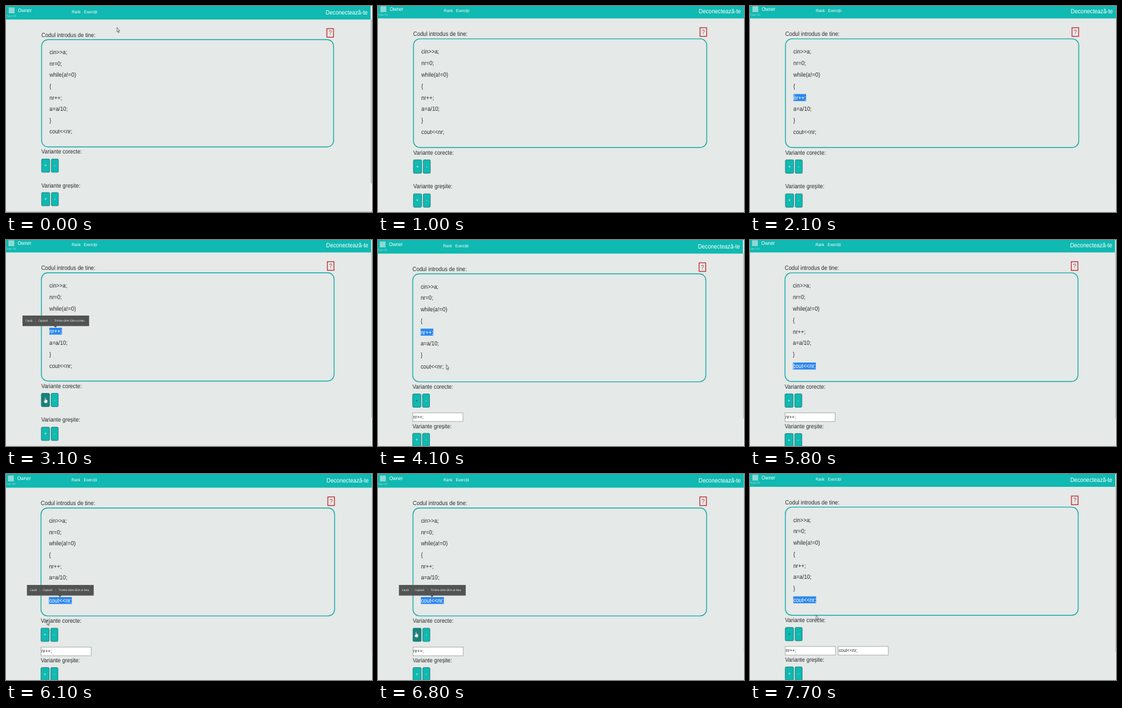
Recreate the animation shown at these times as an HTML page. Size 600 px wide and 338 px high, loop 8000 ms.

```html
<!DOCTYPE html>
<html lang="ro">
<head>
<meta charset="utf-8">
<title>Variante de cod</title>
<style>
  html, body { margin: 0; width: 100%; height: 100%; overflow: hidden; background: #e5e9e8; }
  svg { display: block; width: 600px; height: 338px; }

  text {
    font: 8.87px "Liberation Sans", Arial, sans-serif;
    fill: #2b2f2f;
    text-rendering: geometricPrecision;
    transform-box: fill-box;
    transform-origin: 0 81%;
    transform: scaleY(1.12);
  }
  .bar text { fill: #fff; }
  .bar .user { font-size: 7.6px; }
  .bar .link { font-size: 6.2px; }
  .bar .exit { font-size: 9.1px; }
  .bar .brand { font-size: 4.1px; fill: #a5dfdb; }
  .teal { fill: #10b9b1; }
  .frame { fill: none; stroke: #18ada7; stroke-width: 1.4; }
  .help rect { fill: none; stroke: #c4383a; stroke-width: 1.4; }
  .help text { fill: #b83a3c; font-size: 9px; text-anchor: middle; }
  .btn rect { fill: #10b9b1; stroke: #17706c; stroke-width: .8; }
  .btn text { fill: #fff; font-size: 6.6px; text-anchor: middle; }
  .field rect { fill: #fff; stroke: #999e9d; stroke-width: .8; }
  .field text { font-size: 7.3px; }
  .sel rect { fill: #2c87ec; }
  .sel text { fill: #fff; }
  .tip { fill: #525454; }
  .tip text { font: 4.2px "Open Sans", sans-serif; fill: #fff; }
  .tip line { stroke: #858787; stroke-width: .5; }

  .cam, .sel, .tip, .lower, .field, .cursor, .cursor g, .add rect, .add text {
    animation: 8s step-end infinite;
  }
  .cam { animation-name: cam; }
  .sel1 { animation-name: sel1; }
  .sel2 { animation-name: sel2; }
  .tip { animation-name: tip; }
  .lower { animation-name: lower; }
  .field1 { animation-name: field1; }
  .field2 { animation-name: field2; }
  .add rect { animation-name: hover; }
  .add text { animation-name: focus; }
  .cursor { animation-name: pointer; }
  .cursor .arrow { animation-name: arrow; }
  .cursor .beam { animation-name: beam; }
  .cursor .hand { animation-name: hand; }

  @keyframes cam {
    0% { transform: none; }
    12.5% { transform: translate(-.5px, -2.1px) scale(1.0045, 1.0135); }
    36.25% { transform: translate(-.5px, -2px) scale(1.0025, 1.0097); }
    51.25% { transform: translate(-1.7px, 0) scale(1.004, 1.006); }
    63.75% { transform: translate(-1.2px, -2.1px) scale(1.0035, 1.0135); }
    76.25% { transform: translate(-1.3px, .1px) scale(1.0055, 1.007); }
    90%, 100% { transform: translate(-.6px, -1.3px) scale(1.003, 1.008); }
  }
  @keyframes sel1 {
    0% { clip-path: inset(0 0 0 100%); }
    23.75% { clip-path: inset(0 0 0 75%); }
    25% { clip-path: inset(0 0 0 40%); }
    26.25% { clip-path: inset(0); }
    60%, 100% { clip-path: inset(0 0 0 100%); }
  }
  @keyframes sel2 {
    0% { clip-path: inset(0 0 0 100%); }
    61.25% { clip-path: inset(0 0 0 50%); }
    63.75%, 100% { clip-path: inset(0); }
  }
  @keyframes tip {
    0% { visibility: hidden; transform: translate(27.4px, 124.6px); }
    36.25% { visibility: visible; transform: translate(27.4px, 124.6px); }
    48.75% { visibility: hidden; transform: translate(35.3px, 180.7px); }
    76.25% { visibility: visible; transform: translate(35.3px, 180.7px); }
    90%, 100% { visibility: hidden; transform: translate(35.3px, 180.7px); }
  }
  @keyframes lower {
    0% { transform: none; }
    51.25%, 100% { transform: translateY(9.2px); }
  }
  @keyframes field1 {
    0% { visibility: hidden; }
    51.25%, 100% { visibility: visible; }
  }
  @keyframes field2 {
    0% { visibility: hidden; }
    90%, 100% { visibility: visible; }
  }
  @keyframes hover {
    0% { fill: #10b9b1; }
    38.75% { fill: #14827e; }
    51.25% { fill: #10b9b1; }
    77.5% { fill: #14827e; }
    96.25%, 100% { fill: #10b9b1; }
  }
  @keyframes focus {
    0% { fill: #fff; }
    48.75% { fill: #17504d; }
    60% { fill: #fff; }
    90%, 100% { fill: #17504d; }
  }
  @keyframes pointer {
    0% { transform: translate(182px, 35px); }
    12.5% { transform: translate(94px, 150px); }
    23.75% { transform: translate(87px, 150px); }
    25% { transform: translate(80px, 150px); }
    26.25% { transform: translate(72.6px, 150px); }
    36.25% { transform: translate(70px, 215px); }
    38.75% { transform: translate(64.8px, 257.5px); }
    51.25% { transform: translate(113.3px, 203.2px); }
    60% { transform: translate(109px, 206px); }
    61.25% { transform: translate(90px, 206px); }
    63.75% { transform: translate(72.4px, 206px); }
    76.25% { transform: translate(68px, 238px); }
    77.5% { transform: translate(63.3px, 256.5px); }
    96.25%, 100% { transform: translate(108.8px, 231px); }
  }
  @keyframes arrow {
    0% { visibility: visible; }
    12.5% { visibility: hidden; }
    36.25% { visibility: visible; }
    38.75% { visibility: hidden; }
    51.25% { visibility: visible; }
    60% { visibility: hidden; }
    76.25% { visibility: visible; }
    77.5% { visibility: hidden; }
    96.25%, 100% { visibility: visible; }
  }
  @keyframes beam {
    0% { visibility: hidden; }
    12.5% { visibility: visible; }
    36.25% { visibility: hidden; }
    60% { visibility: visible; }
    76.25%, 100% { visibility: hidden; }
  }
  @keyframes hand {
    0% { visibility: hidden; }
    38.75% { visibility: visible; }
    51.25% { visibility: hidden; }
    77.5% { visibility: visible; }
    96.25%, 100% { visibility: hidden; }
  }
</style>
</head>
<body>
<svg viewBox="0 0 600 338">
  <g class="cam">
    <rect x="597.7" y="-5" width="10" height="350" fill="#f0f2f1"/>
    <rect x="597.7" y="22" width="10" height="269" fill="#c3c7c6"/>
    <rect x="-5" y="336.6" width="610" height="4" fill="#c6cac9"/>

    <g class="bar">
      <rect class="teal" x="-5" y="-5" width="602.7" height="27.2"/>
      <rect x="4.5" y="2.5" width="9.5" height="9.5" fill="#8fd8d3"/>
      <text class="brand" x=".6" y="17.6">Tutor OX</text>
      <text class="user" x="19.6" y="10.3">Owner</text>
      <text class="link" x="108" y="12.4">Rank</text>
      <text class="link" x="128" y="12.4">Exerciții</text>
      <text class="exit" x="524" y="14">Deconectează-te</text>
    </g>

    <text x="58" y="50.8">Codul introdus de tine:</text>
    <g class="help">
      <rect x="526" y="37.2" width="10.8" height="14"/>
      <text x="531.4" y="47.4">?</text>
    </g>

    <rect class="frame" x="58.4" y="55.2" width="478.6" height="176" rx="10.5"/>
    <g>
      <text x="71.3" y="79.2">cin&gt;&gt;a;</text>
      <text x="71.3" y="97.8">nr=0;</text>
      <text x="71.3" y="116.4">while(a!=0)</text>
      <text x="71.3" y="135">{</text>
      <text x="71.3" y="153.6">nr++;</text>
      <text x="71.3" y="172.2">a=a/10;</text>
      <text x="71.3" y="190.9">}</text>
      <text x="71.3" y="209.5">cout&lt;&lt;nr;</text>
    </g>
    <g class="sel sel1">
      <rect x="71.1" y="144.4" width="21" height="11.6"/>
      <text x="71.3" y="153.6">nr++;</text>
    </g>
    <g class="sel sel2">
      <rect x="71.1" y="200.3" width="37.8" height="11.6"/>
      <text x="71.3" y="209.5">cout&lt;&lt;nr;</text>
    </g>

    <text x="58" y="242.4">Variante corecte:</text>
    <g class="btn add">
      <rect x="58.3" y="251.1" width="13.4" height="21.7" rx="1.6"/>
      <text x="65" y="264.2">+</text>
    </g>
    <g class="btn">
      <rect x="74.3" y="251.1" width="11.6" height="21.7" rx="1.6"/>
      <text x="80.1" y="264.2">-</text>
    </g>

    <g class="field field1">
      <rect x="58.3" y="282" width="82" height="14"/>
      <text x="59" y="291.4">nr++;</text>
    </g>
    <g class="field field2">
      <rect x="144.7" y="282" width="82" height="14"/>
      <text x="145.6" y="291.4">cout&lt;&lt;nr;</text>
    </g>

    <g class="lower">
      <text x="58" y="297.6">Variante greșite:</text>
      <g class="btn">
        <rect x="58.3" y="306.1" width="13.4" height="21.7" rx="1.6"/>
        <text x="65" y="319.2">+</text>
        <rect x="74.3" y="306.1" width="11.6" height="21.7" rx="1.6"/>
        <text x="80.1" y="319.2">-</text>
      </g>
    </g>

    <g class="tip">
      <path d="M0 0H109V17.2H56.5L54 19.7 51.5 17.2H0Z"/>
      <line x1="21.3" x2="21.3" y1="6" y2="11"/>
      <line x1="47.2" x2="47.2" y1="6" y2="11"/>
      <text x="5" y="10.2">Caută</text>
      <text x="26" y="10.2">Copiază</text>
      <text x="52" y="10.2">Trimite către Glim-ul meu</text>
    </g>

    <g class="cursor">
      <g class="arrow">
        <path d="M0 0V7.6L1.5 6.2 2.5 8.8 3.5 8.3 2.5 5.8H4.4Z" fill="#f4f6f6" stroke="#3c4040" stroke-width=".7"/>
      </g>
      <g class="beam">
        <path d="M-1.2 -4H1.2M0 -4V4M-1.2 4H1.2" fill="none" stroke="#e8eeee" stroke-width=".7"/>
      </g>
      <g class="hand">
        <path d="M-.8 .7Q0 -.5 .8 .7V3.6L3.2 4.4Q3.9 4.8 3.7 6L2.9 9.6H-1L-2.9 6.2Q-2.7 5-.8 6Z" fill="#fff" stroke="#2f4a4a" stroke-width=".5"/>
      </g>
    </g>
  </g>
</svg>
</body>
</html>
```
